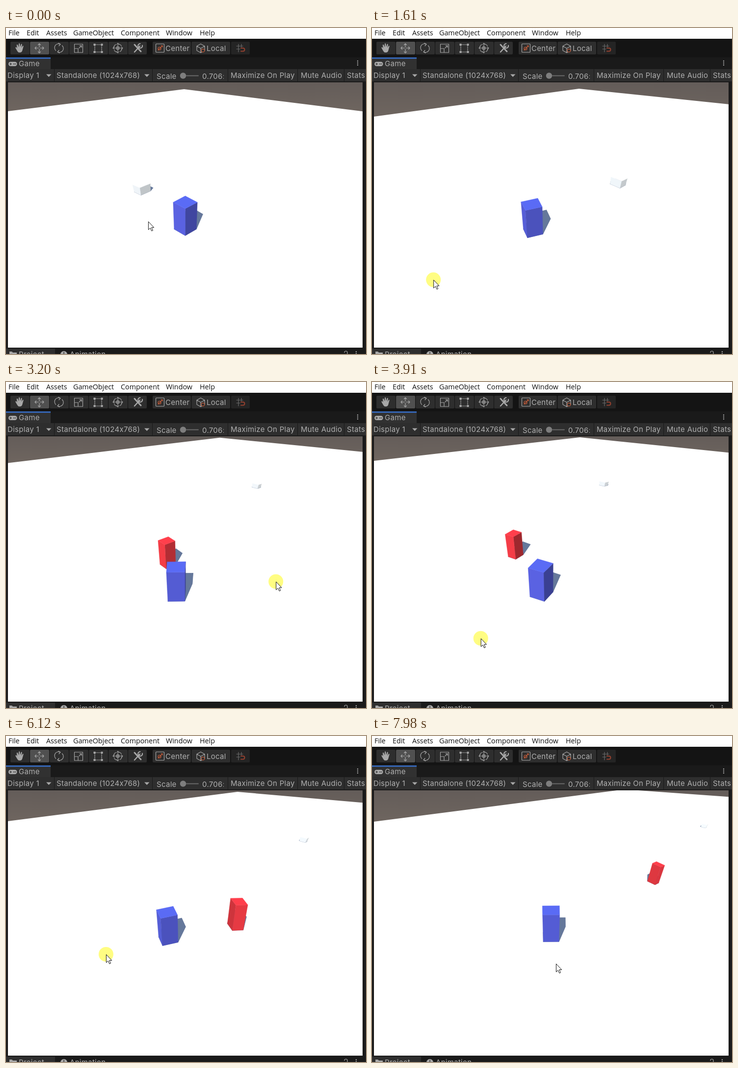
These frames come from a looping animation (734x666 px, 8000 ms). An HTML page:

```html
<!DOCTYPE html>
<html lang="en">
<head>
<meta charset="utf-8">
<title>Game view</title>
<style>
html, body { margin: 0; width: 100%; height: 100%; overflow: hidden; background: #1a1a1a; }
svg { display: block; width: 734px; height: 666px; }
.menu { font: 14.3px "Open Sans", "Noto Sans", sans-serif; fill: #111; }
.ui { font: 15px Inter, Roboto, sans-serif; letter-spacing: .3px; fill: #b0b0b0; }
.icon { fill: none; stroke: #a8a8a8; stroke-width: 1.2; stroke-linejoin: round; stroke-linecap: round; }
.solid { fill: #a8a8a8; stroke: none; }
.hot { stroke: #c45c3a; }
</style>
</head>
<body>
<svg viewBox="0 0 734 666" xmlns="http://www.w3.org/2000/svg">
  <defs>
    <clipPath id="view"><rect x="4" y="111" width="723" height="542"/></clipPath>
    <clipPath id="zoom"><rect x="395" y="84" width="49" height="26"/></clipPath>
    <linearGradient id="sky" x1="0" y1="0" x2="0" y2="1">
      <stop offset="0" stop-color="#625b58"/><stop offset="1" stop-color="#6e655f"/>
    </linearGradient>
  </defs>
  <rect width="734" height="666" fill="#1a1a1a"/>
  <g id="panels"></g>
  <g id="labels"></g>
  <g class="icon">
    <path class="solid" d="M23 47 19.500 41q-.6-1.600.7-1.900 1 0 2.500 2.400L21.800 35q.3-2 2-.8l1.900 5 .4-7q.9-1.700 2 0l.7 6.800 1.900-6q1.400-1.200 2 .4l-1.100 7 2.300-3.800q1.700-.9 1.700.8L33 47q-1.200 3-3.500 3H26q-1.600-.5-3-3Z"/>
    <path d="M60 41h6m4 0h7M68 33v6m0 4v6M65.500 34.500 68 32l2.500 2.500m-5 14L68 51l2.500-2.500m-9-10L59 41l2.500 2.500m13-5L77 41l-2.500 2.500"/>
    <path d="M101.500 46a8 8 0 0 1 9-13m4 3a8 8 0 0 1-9 13M107 31l4 2-3 3.500M109 51l-4-2 3-3.500"/>
    <path d="M139.500 33h17v17h-17zM139.500 42h7.500v8M149 41l5-5m-4 0h4v4"/>
    <path d="M181 35v13m14-13v13M182 34h12m-12 15h12" stroke-dasharray="2.500 1.500"/>
    <path class="solid" d="M178.500 32h4v4h-4zm15 0h4v4h-4zm-15 15h4v4h-4zm15 0h4v4h-4z"/>
    <circle cx="228" cy="41" r="8.500" stroke-dasharray="8.500 4.850"/>
    <path d="M222 41h12m-6-6v12M226 34l2-3 2 3m-4 14 2 3 2-3m-9-9-3 2 3 2m14-4 3 2-3 2M225.500 38.500h5v5h-5z"/>
    <path d="m262 34 13 14" stroke-width="3"/>
    <path d="m262 49 11-12" stroke-width="2.500"/>
    <path d="M278 35.500a4.500 4.500 0 1 1-4.500-3.500" stroke-width="2.200"/>
    <rect x="305.500" y="32.500" width="17" height="17" rx="1"/>
    <path class="hot" d="M310 45.500 319 36m-3 0h3v3"/><circle class="hot" cx="313" cy="42" r="3"/>
    <path d="m389 37 8-4.500 8 4.500v9l-8 4.500-8-4.500zm0 0 8 4.500 8-4.500m-8 4.500V50"/>
    <circle class="hot" cx="401.500" cy="46" r="3.200" fill="#2d2d2d"/>
    <path d="M470 37h13m-13 6h7m-3-10v16m6-16v6" stroke="#6c6c6c"/>
    <path d="M479 41h4q3.500 0 3.500 3.200T483 47.500h-4" stroke="#94412f" stroke-width="2"/>
    <rect class="solid" x="5" y="69" width="17.500" height="9" rx="4.500"/>
    <path d="M7.500 73.500h4m-2-2v4" stroke="#313131"/>
    <path d="M16 73.500h.1m2.900 0h.1" stroke="#313131" stroke-width="2.200"/>
    <path class="solid" d="M82 94.500h10.500L87.200 100zM282 94.500h10.500L287.200 100z"/>
    <path d="M368 97.500h24" stroke="#696969" stroke-width="2"/>
    <circle cx="361" cy="97.500" r="6.200" fill="#7e7e7e" stroke="none"/>
    <path class="solid" d="M7 661h5l2 2h8v4H7z"/>
    <circle class="solid" cx="118" cy="667" r="7"/><path d="M118 662v5" stroke="#1a1a1a"/>
    <path d="M690 663q0-3 3-3t3 3v4"/>
    <path d="M717 67.500v.1m0 3.900v.1m0 3.900v.1M714 661.500v.1m0 3.900v.1" stroke-width="2.500"/>
  </g>
  <g clip-path="url(#view)">
    <rect x="4" y="111" width="723" height="542" fill="#fff"/>
    <polygon id="horizon" fill="url(#sky)"/>
    <g id="scene" stroke-linejoin="round"></g>
    <g id="pointer">
      <circle id="halo" r="15" fill="#fffd82"/>
      <path d="M.5.5V17L4.300 13.500 7 19.500 9.500 18.400 6.900 12.500H11.800Z" fill="#fff" stroke="#111"/>
    </g>
  </g>
</svg>
<script>
const LOOP = 8000;
const el = id => document.getElementById(id);

// Editor chrome
const rect = (x, y, w, h, fill, rx = 0) =>
  `<rect x="${x}" y="${y}" width="${w}" height="${h}" fill="${fill}" rx="${rx}"/>`;
const text = (cls, x, y, s, more = "") => `<text class="${cls}" x="${x}" y="${y}" ${more}>${s}</text>`;

el("panels").innerHTML = rect(0, 0, 734, 22, "#fff") + rect(0, 22, 734, 38, "#141414") +
  [...Array(7).keys()].map(i => rect(9 + i * 40, 28, i == 6 ? 38 : 39, 26, i == 1 ? "#505050" : "#2e2e2e", 2)).join("") +
  rect(299, 28, 78, 26, "#2e2e2e", 2) + rect(378.5, 28, 78.5, 26, "#2e2e2e", 2) + rect(459, 28, 38, 26, "#242424", 2) +
  rect(0, 61, 91, 23, "#313131") + rect(0, 60, 91, 3, "#3565b4") + rect(0, 84, 734, 25, "#2e2e2e") +
  [98, 298, 452, 594, 689].map(x => rect(x, 84, 1, 25, "#1a1a1a")).join("") +
  rect(0, 655, 100, 11, "#2e2e2e");

el("labels").innerHTML =
  [[5, "File"], [42, "Edit"], [82, "Assets"], [137, "GameObject"], [234, "Component"], [326, "Window"], [395, "Help"]]
    .map(([x, s]) => text("menu", x, 15, s)).join("") +
  [[325, 47, "Center"], [409, 47, "Local"], [26, 78, "Game"], [3, 102, "Display 1"], [103, 102, "Standalone (1024x768)"],
   [307, 104, "Scale"], [458, 102, "Maximize On Play"], [601, 102, "Mute Audio"], [695, 102, "Stats"],
   [26, 672, "Project"], [130, 672, "Animation"]]
    .map(([x, y, s]) => text("ui", x, y, s)).join("") +
  text("ui", 400, 104, "0.706:", 'clip-path="url(#zoom)"');

// Key points: time, then position on screen and extras
const corner = [ // apex x, y, left edge y
  [0, 363, 125, 170], [1610, 422, 124, 181], [2500, 450, 116, 173], [3910, 424, 113, 161],
  [5090, 470, 114, 174], [6120, 472, 114, 174], [7980, 515, 109, 175]];
const cursor = [
  [0, 290, 395], [500, 235, 465], [1100, 145, 350], [1350, 118, 400], [1610, 125, 514], [2000, 240, 605],
  [2500, 384, 522], [3050, 540, 475], [3350, 525, 365], [3700, 340, 560], [3910, 222, 524], [4190, 200, 402],
  [5090, 409, 277], [5550, 375, 530], [6120, 204, 446], [6850, 247, 494], [7980, 375, 465]];
const player = [ // with turn away from the cursor
  [0, 365.5, 411, 23], [1610, 328.5, 416, 28], [2500, 348, 434, 37], [3910, 345.5, 434, -5],
  [4190, 348, 416, -8], [5090, 361, 389, -19], [6120, 331, 416, 10], [7980, 365, 411, 5]];
const enemy = [ // with turn away from the player
  [1780, 276, 775, -19], [2500, 370, 442, -19], [3910, 293, 355, -26], [4500, 408, 336, 0],
  [5090, 516, 408, 21], [6120, 467.5, 390, -4], [7980, 573, 298.5, -18]];
const crate = [
  [0, 278, 334], [800, 385, 318], [1610, 501, 320], [2500, 558, 234], [3910, 472, 211], [5090, 601, 216],
  [6120, 606, 215], [7980, 676, 186]];

// Smooth curve through all rows
function sample(rows, t) {
  const i = rows.findIndex(r => r[0] > t) - 1;
  if (i < 0) return rows[t < rows[0][0] ? 0 : rows.length - 1].slice(1);
  const a = rows[i], b = rows[i + 1], p = rows[i - 1] || a, n = rows[i + 2] || b;
  const d = b[0] - a[0], u = (t - a[0]) / d, u2 = u * u, u3 = u2 * u;
  return a.slice(1).map((v, k) => {
    const w = b[k + 1];
    const m0 = (w - p[k + 1]) / (b[0] - p[0]) * d, m1 = (n[k + 1] - v) / (n[0] - a[0]) * d;
    return v * (2 * u3 - 3 * u2 + 1) + m0 * (u3 - 2 * u2 + u) + w * (3 * u2 - 2 * u3) + m1 * (u3 - u2);
  });
}

const RAD = Math.PI / 180, CENTER = 365, VANISH = 82;

// Yaw that points a side at a spot on the ground
const aim = ([x, y], [tx, ty]) => Math.atan2((ty - y) / .52, tx - x) / RAD - 45;
const poly = (pts, fill) =>
  `<polygon points="${pts.map(p => p.map(v => v.toFixed(2)).join()).join(" ")}" fill="${fill}" stroke="${fill}" stroke-width=".4"/>`;
const tint = (rgb, f) => `rgb(${rgb.map(v => Math.round(v * f))})`;

function ring(x, y, r, yaw, squash, skew) {
  return [0, 1, 2, 3].map(i => {
    const a = (yaw + i * 90) * RAD, dx = r * Math.cos(a);
    return [x + dx, y + r * squash * Math.sin(a) + skew * dx];
  });
}

const facesUs = pts => pts.reduce((s, p, i) => {
  const q = pts[(i + 1) % pts.length];
  return s + p[0] * q[1] - q[0] * p[1];
}, 0) > 0;

// The light swings a little with the place on screen
const lit = (a, off) => .62 + .34 * Math.max(0, Math.cos((a - 125 + off * .25) * RAD));

// A standing box: size, lean, tilt and shadow all follow from where it stands
function box([x, y], yaw, { width, height, top, side, shade = lit }) {
  const depth = y - VANISH, off = x - CENTER;
  const r = width * depth, h = height * depth, squash = .0016 * depth, skew = .004 * squash * off;
  const hi = ring(x + off * h * .0015, y - h, r, yaw, squash, skew);
  const lo = ring(x, y, r * .92, yaw, squash * 1.1, skew);
  const far = lo.map(([px, py]) => [px + h * (.24 - .0011 * off), py - h * squash * 1.06]);
  const shadow = "#65789b";
  let dark = poly(far, shadow), faces = "";
  for (let i = 0; i < 4; i++) {
    const j = (i + 1) % 4, face = [hi[j], hi[i], lo[i], lo[j]];
    dark += poly([lo[i], lo[j], far[j], far[i]], shadow);
    if (facesUs(face)) faces += poly(face, tint(side, shade(yaw + 45 + i * 90, off, yaw)));
  }
  return { y, dark, faces: faces + poly(hi, top) };
}

const BLUE = { width: .075, height: .167, top: "#5a6bf5", side: [94, 103, 236] };
const RED = { width: .061, height: .168, top: "#ff3f4c", side: [255, 64, 74] };

function render(t) {
  const [ax, ay, left] = sample(corner, t);
  const right = ay + (727 - ax) * (.124 - .00034 * (ax - 363));
  el("horizon").setAttribute("points", `4,100 4,${left} ${ax},${ay} 727,${right} 727,100`);

  const mouse = sample(cursor, t), me = sample(player, t), foe = sample(enemy, t), c = sample(crate, t);
  const age = t / LOOP;
  const white = {
    width: .073, height: .06, top: "#fff", side: [246, 252, 256],
    shade: (a, off, yaw) => a - yaw > 90 ? .97 + .03 * age : .78 + .09 * age
  };
  const boxes = [box(c, (CENTER - c[0]) * .12, white), box(me, aim(me, mouse) + me[2], BLUE)];
  if (t > enemy[0][0]) boxes.push(box(foe, aim(foe, me) + foe[2], RED));
  boxes.sort((a, b) => a.y - b.y);
  el("scene").innerHTML = boxes.map(b => b.dark).join("") + boxes.map(b => b.faces).join("");

  el("pointer").setAttribute("transform", `translate(${mouse})`);
  el("halo").setAttribute("visibility", t > 350 && t < 7200 ? "visible" : "hidden");
}

const start = performance.now();
function tick() {
  render((performance.now() - start) % LOOP);
  requestAnimationFrame(tick);
}
tick();
</script>
</body>
</html>
```
